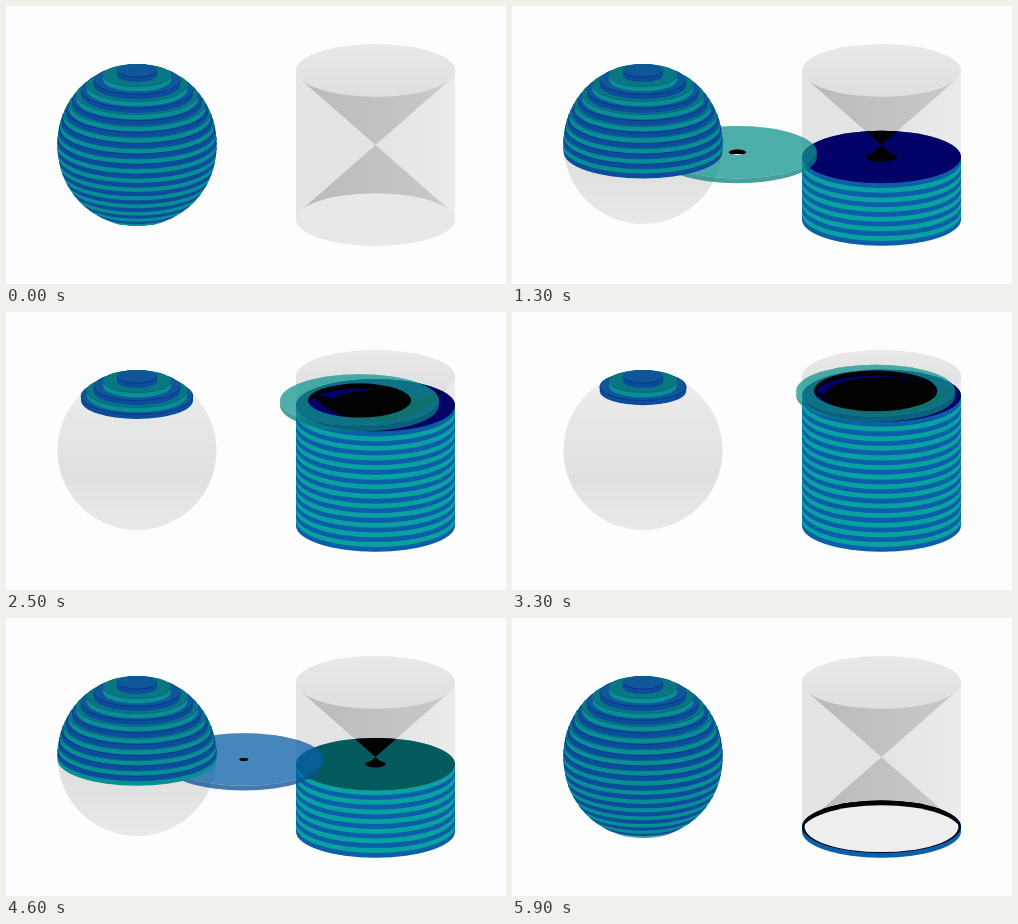
An HTML page with a canvas that plays this animation: 500x278 px, repeating every 6 s.

```html
<!DOCTYPE html>
<html lang="en">
<head>
<meta charset="utf-8">
<title>Sphere and cylinder minus double cone</title>
<style>
html, body { margin: 0; width: 100%; height: 100%; overflow: hidden; background: #fdfdfd; }
canvas { display: block; width: 500px; height: 278px; }
</style>
</head>
<body>
<canvas id="stage" width="500" height="278"></canvas>
<script>
const ctx = document.getElementById('stage').getContext('2d');
const TAU = Math.PI * 2;
const SLABS = 31, LOOP = 6000, STEP = 100;
const R = 79.5, FLAT = 0.33, RISE = 74.5;    // radius, ellipse ratio, projected half height
const MID = 139, SPHERE_X = 131, CYL_X = 369.5;
const THICK = 2 * RISE / SLABS;
const TILT = Math.asin(R * FLAT / RISE);     // where the cone outline touches its rim

const BLUE = { side: '#0b5fa9', ball: '#0b4c9c', lid: '#0f5798', face: '#020268', fly: '#095fa9', rim: '#0b4f92' };
const TEAL = { side: '#0aa2a1', ball: '#088f95', lid: '#08777f', face: '#045a5c', fly: '#13968f', rim: '#0b827e' };

const colour = i => i % 2 ? TEAL : BLUE;
const level = i => -1 + 2 * i / SLABS;
const yOf = z => MID - RISE * z;
const ease = u => (1 - Math.cos(Math.PI * u)) / 2;
const discRadius = z => Math.sqrt(1 - z * z);

function ring(x, y, r) {
  ctx.moveTo(x + r * R, y);
  ctx.ellipse(x, y, r * R, r * R * FLAT, 0, 0, TAU);
}

function fillRing(x, y, r, fill) {
  ctx.beginPath();
  ring(x, y, r);
  ctx.fillStyle = fill;
  ctx.fill();
}

// Outline of an upright drum between two heights
function drum(x, top, bottom, r) {
  const a = r * R, b = a * FLAT;
  ctx.beginPath();
  ctx.ellipse(x, top, a, b, 0, Math.PI, TAU);
  ctx.ellipse(x, bottom, a, b, 0, 0, Math.PI);
  ctx.closePath();
}

function gradient(x0, y0, x1, y1, ...stops) {
  const g = ctx.createLinearGradient(x0, y0, x1, y1);
  stops.forEach((c, i) => g.addColorStop(i / (stops.length - 1), c));
  return g;
}

// Part of the cone seen through both of its walls, from apex to rim at z
function wedge(z) {
  const a = Math.abs(z) * R;
  ctx.beginPath();
  ctx.moveTo(CYL_X, MID);
  if (z > 0) ctx.ellipse(CYL_X, yOf(z), a, a * FLAT, 0, TILT, Math.PI - TILT);
  else ctx.ellipse(CYL_X, yOf(z), a, a * FLAT, 0, Math.PI + TILT, TAU - TILT);
  ctx.closePath();
}

function ghosts() {
  ctx.beginPath();
  ctx.arc(SPHERE_X, 138.5, R, 0, TAU);
  ctx.fillStyle = gradient(0, 59, 0, 218, '#efefef', '#e6e6e7', '#e0e0e1', '#e9e9ea');
  ctx.fill();

  drum(CYL_X, yOf(1), yOf(-1), 1);
  ctx.fillStyle = gradient(CYL_X - R, 0, CYL_X + R, 0, '#e4e4e5', '#e3e3e4', '#ebebec');
  ctx.fill();
  fillRing(CYL_X, yOf(1), 1, gradient(0, 38, 0, 91, '#e9e9ea', '#dedee0'));
  fillRing(CYL_X, yOf(-1), 1, '#e8e8e9');

  ctx.fillStyle = gradient(CYL_X - R, 0, CYL_X + R, 0, '#bababb', '#c1c1c2', '#cacacb');
  wedge(1);
  ctx.fill();
  wedge(-1);
  ctx.fill();
}

function darkCone(z) {
  if (z < 0) {
    wedge(1);
    ctx.fill();
    wedge(z);
    ctx.fill();
    return;
  }
  ctx.save();
  ctx.beginPath();
  ctx.rect(0, 0, 500, MID - z * (RISE - R * FLAT * Math.sin(TILT)));
  ctx.clip();
  wedge(1);
  ctx.fill();
  ctx.restore();
}

function cylinderStack(count) {
  if (!count) return;
  for (let i = 0; i < count; i++) {
    drum(CYL_X, yOf(level(i + 1)), yOf(level(i)), 1);
    ctx.fillStyle = colour(i).side;
    ctx.fill();
  }
  const z = level(count), y = yOf(z);
  const hole = Math.abs(level(count - 0.5));
  fillRing(CYL_X, y, 1, count === 1 ? '#020212' : colour(count - 1).face);

  ctx.save();
  ctx.beginPath();
  ring(CYL_X, y, 1);
  ctx.clip();
  ctx.fillStyle = '#020203';
  darkCone(z);
  fillRing(CYL_X, y, hole, '#020203');
  if (z < 0) {
    // floor seen through the opening
    ctx.beginPath();
    ring(CYL_X, y, hole);
    ctx.clip();
    fillRing(CYL_X, yOf(-1), 1, '#eeeeef');
  }
  ctx.restore();
}

function sphereStack(first) {
  for (let i = first; i < SLABS; i++) {
    const r = discRadius(level(i + 0.5));
    const top = yOf(level(i + 1)), c = colour(i);
    drum(SPHERE_X, top, yOf(level(i)), r);
    ctx.fillStyle = c.ball;
    ctx.fill();
    fillRing(SPHERE_X, top, r, c.lid);
    ctx.beginPath();
    ctx.ellipse(SPHERE_X, top, r * R, r * R * FLAT, 0, 0, Math.PI);
    ctx.strokeStyle = i % 2 ? '#0a5f8a' : '#082f84';
    ctx.lineWidth = 0.8;
    ctx.stroke();
  }
}

// The travelling slab opens from a disc into a ring of the same area
function flyer(i, u) {
  const z = level(i + 0.5), e = ease(u), c = colour(i);
  const x = SPHERE_X + (CYL_X - SPHERE_X) * e;
  const start = discRadius(z);
  const outer = start + (1 - start) * ease(Math.min(1, e / 0.6));
  const inner = Math.sqrt(Math.max(0, outer * outer - start * start));
  const top = yOf(level(i + 1)), bottom = top + THICK;

  ctx.save();
  ctx.globalAlpha = 0.75;
  drum(x, top, bottom, outer);
  ring(x, top, outer);
  ctx.save();
  ctx.clip();
  ctx.beginPath();
  ctx.rect(0, 0, 500, 278);
  ring(x, top, outer);
  ctx.fillStyle = c.rim;
  ctx.fill('evenodd');
  ctx.restore();

  ctx.beginPath();
  ring(x, top, outer);
  ring(x, top, inner);
  ctx.fillStyle = c.fly;
  ctx.fill('evenodd');
  ctx.restore();

  if (inner > 0.01) {
    ctx.save();
    ctx.beginPath();
    ring(x, top, inner);
    ctx.clip();
    ctx.beginPath();
    ctx.rect(0, 0, 500, 278);
    ring(x, bottom, inner);
    ctx.fillStyle = '#020203';
    ctx.fill('evenodd');
    ctx.restore();
  }
}

function draw(t) {
  const p = Math.floor(t % LOOP / STEP) * STEP / LOOP;
  const s = SLABS * (1 - Math.abs(1 - 2 * p));
  const i = Math.min(SLABS, Math.floor(s + 1e-9));
  ctx.fillStyle = '#fdfdfd';
  ctx.fillRect(0, 0, 500, 278);
  ghosts();
  cylinderStack(i);
  if (i < SLABS) flyer(i, Math.max(0, s - i));
  sphereStack(i + 1);
}

const begin = performance.now();
function tick() {
  draw(performance.now() - begin);
  requestAnimationFrame(tick);
}
tick();
</script>
</body>
</html>
```
